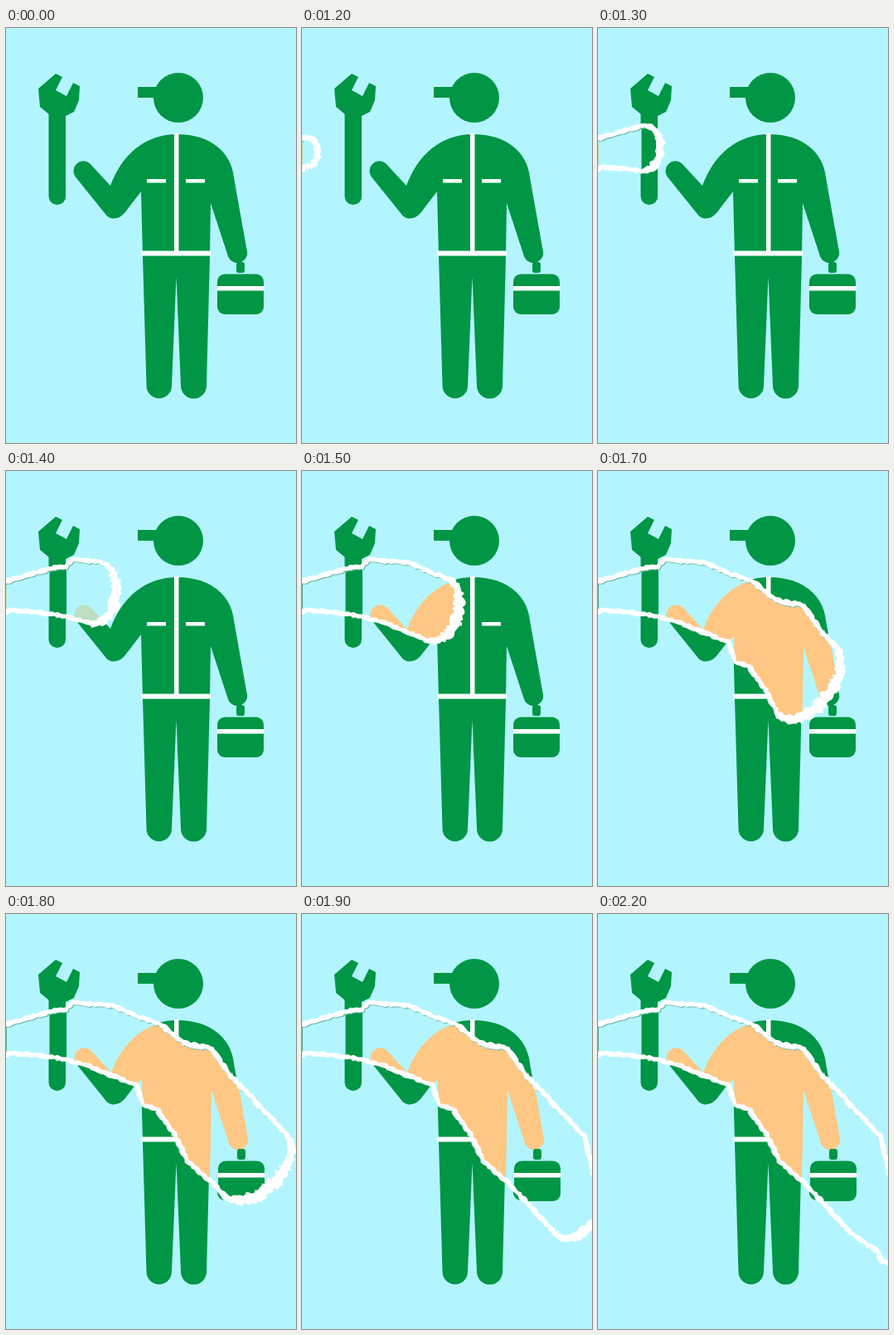
An HTML page with a canvas that plays this animation: 350x500 px, repeating every 3500 ms.

```html
<!DOCTYPE html>
<html lang="en">
<head>
<meta charset="utf-8">
<title>Torn workwear</title>
<style>
html, body { margin: 0; width: 100%; height: 100%; overflow: hidden; background: #b3f5ff; }
canvas { display: block; }
</style>
</head>
<body>
<canvas id="stage" width="350" height="500"></canvas>
<script>
const ctx = document.getElementById('stage').getContext('2d');
const SKY = '#b3f5ff', GREEN = '#009645', SKIN = '#ffc784', PALE_SKIN = '#bfdfc2';
const LOOP = 3500, TEAR_START = 1200, STEP = 100, LAST_STEP = 10;

const body = new Path2D(`M83.5 179 A12 12 0 0 1 101 163 L126 190
  C140 152 168 128 207 128 C246 128 272 149 275 180
  L290.5 267 A11.7 11.7 0 0 1 268 275 L247 211 L246 275 L242 431
  A15.5 15.5 0 0 1 211 431 L205.5 300 L200 431 A15.2 15.2 0 0 1 169.5 431
  L165 275 L163 197 L143 223 Q137 230 128 229.5 Q122 228 119 223 Z`);
const jaw = new Path2D(`M60 55 L68 59 L60 75 L73 82 L81 66 L89 70 L88 87 L82 101
  L72 106 L52 104 L41 95 L39 73 Z`);

// Corners of the two tear edges
const upper = [[-3, 134], [55, 117], [72, 115], [80, 107], [128, 110], [162, 125], [185, 132],
  [216, 156], [248, 162], [270, 194], [341, 268], [356, 333]];
const lower = [[-3, 172], [5, 167], [62, 173], [102, 184], [158, 207], [166, 231], [182, 235],
  [203, 265], [219, 298], [250, 325], [305, 384], [338, 407], [342, 418], [356, 422]];
const EDGE_WIDTH = 6;

function noise(x, y) {
  const v = Math.sin(x * 12.9898 + y * 78.233) * 43758.5453;
  return v - Math.floor(v);
}

// First part of a polyline, up to the given length
function cut(points, length) {
  const result = [points[0]];
  for (let i = 1; i < points.length && length > 0; i++) {
    const [x0, y0] = points[i - 1], [x1, y1] = points[i];
    const size = Math.hypot(x1 - x0, y1 - y0);
    const p = Math.min(1, length / size);
    result.push([x0 + (x1 - x0) * p, y0 + (y1 - y0) * p]);
    length -= size;
  }
  return result;
}

// Bulging front from the end of the upper edge to the end of the lower one: x, y, width
function tearFront([ux, uy], [lx, ly]) {
  const chord = Math.hypot(lx - ux, ly - uy);
  const bulge = 8 + 0.35 * chord;
  const nx = (ly - uy) / chord, ny = (ux - lx) / chord;
  const front = [];
  for (let i = 1; i < 12; i++) {
    const s = i / 12, along = s * s * (3 - 2 * s), out = 3 * s * (1 - s) * bulge;
    front.push([ux + (lx - ux) * along + nx * out, uy + (ly - uy) * along + ny * out,
      EDGE_WIDTH + 0.08 * chord * Math.sin(Math.PI * s)]);
  }
  return front;
}

function polygon(points) {
  const path = new Path2D();
  points.forEach(([x, y]) => path.lineTo(x, y));
  path.closePath();
  return path;
}

// Ragged strip of paper along a polyline
function ribbon(points) {
  const left = [], right = [];
  for (let i = 1; i < points.length; i++) {
    const [x0, y0, width = EDGE_WIDTH] = points[i - 1], [x1, y1] = points[i];
    const length = Math.hypot(x1 - x0, y1 - y0);
    const dx = (x1 - x0) / length, dy = (y1 - y0) / length;
    for (let d = 0; d < length; d += 3.5) {
      const x = x0 + dx * d, y = y0 + dy * d;
      const a = width * (0.3 + 0.4 * noise(x, y)), b = width * (0.3 + 0.4 * noise(y, x));
      left.push([x - dy * a, y + dx * a]);
      right.push([x + dy * b, y - dx * b]);
    }
  }
  return polygon(left.concat(right.reverse()));
}

function rect(color, x, y, w, h, r = 0) {
  ctx.fillStyle = color;
  ctx.beginPath();
  ctx.roundRect(x, y, w, h, r);
  ctx.fill();
}

function drawFigure(color, clothed) {
  rect(GREEN, 159, 71, 26, 13);
  rect(GREEN, 51.5, 92, 20.5, 121, 10);
  ctx.fill(jaw);
  ctx.beginPath();
  ctx.arc(208, 84, 30, 0, Math.PI * 2);
  ctx.fill();
  ctx.fillStyle = color;
  ctx.fill(body);
  if (clothed) {
    rect('#fff', 203, 127, 5.5, 142);
    rect('#fff', 163, 268.5, 84, 6);
    rect('#fff', 170, 182, 23, 4.5);
    rect('#fff', 217, 182, 23, 4.5);
  }
  rect(GREEN, 278, 282, 10, 13, 3);
  rect(GREEN, 255, 296.5, 56, 48.5, 9);
  rect('#fff', 255, 311, 56, 5.5);
}

function drawTear(step) {
  const top = cut(upper, 7 + 52 * step + 2.4 * step ** 2);
  const bottom = cut(lower, 9 + 47 * step + 1.4 * step ** 2);
  const edge = [...top, ...tearFront(top.at(-1), bottom.at(-1)), ...bottom.reverse()];
  const early = step < 3;
  ctx.save();
  ctx.clip(polygon(edge));
  rect(SKY, 0, 0, 350, 500);
  rect(early ? '#c2dfb6' : '#62ae98', 0, 130, 1, 45);
  ctx.translate(1, 1);
  drawFigure(early ? PALE_SKIN : SKIN, false);
  ctx.fillStyle = '#69b9a5';
  ctx.fill(ribbon(top));
  ctx.restore();
  ctx.fillStyle = '#fff';
  ctx.fill(ribbon(edge));
}

const start = performance.now();
function frame() {
  const t = (performance.now() - start) % LOOP;
  rect(SKY, 0, 0, 350, 500);
  drawFigure(GREEN, true);
  if (t >= TEAR_START) {
    drawTear(Math.min(LAST_STEP, Math.floor((t - TEAR_START) / STEP)));
  }
  requestAnimationFrame(frame);
}
frame();
</script>
</body>
</html>
```
